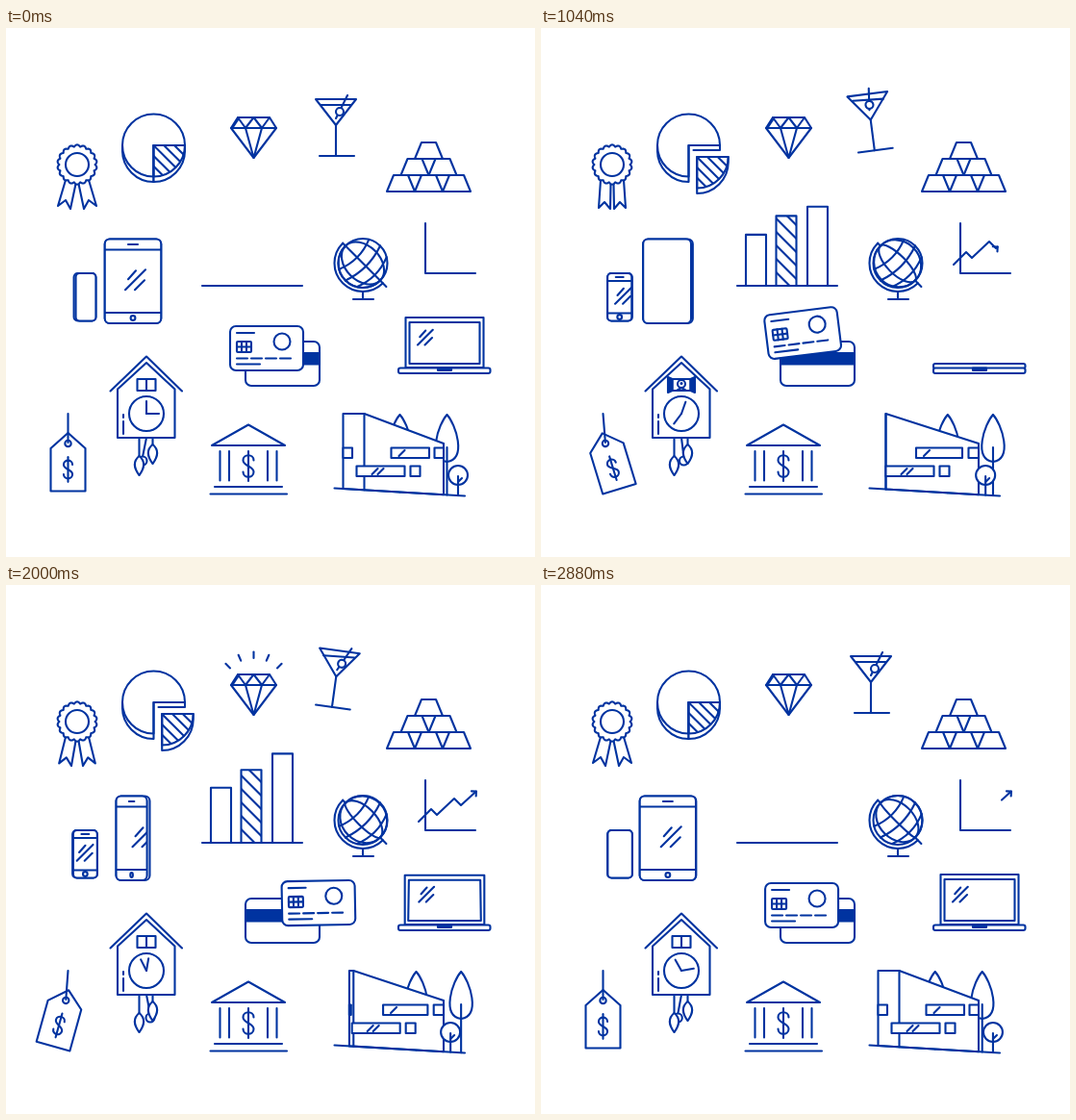
Recreate the animation shown at these times as an HTML page with a canvas. Size 550x550 px, loop 2.96 s.

```html
<!DOCTYPE html>
<html lang="en">
<head>
<meta charset="utf-8">
<title>Finance icons</title>
<style>
html, body { margin: 0; width: 100%; height: 100%; overflow: hidden; background: #fff; }
canvas { display: block; width: 550px; height: 550px; }
</style>
</head>
<body>
<canvas id="stage"></canvas>
<script>
const INK = '#0033a0', PAPER = '#fff';
const STEP = 80, STEPS = 37, LOOP = STEP * STEPS;
const TAU = Math.PI * 2, RAD = Math.PI / 180;
const { sin, cos, abs, min, max, floor, hypot } = Math;

const canvas = document.getElementById('stage');
const g = canvas.getContext('2d');
const dpr = window.devicePixelRatio || 1;
canvas.width = canvas.height = 550 * dpr;

// Timing: linear progress, eased progress, and out-and-back
const span = (t, a, b) => min(1, max(0, (t - a) / (b - a)));
const ease = (t, a, b) => { const u = span(t, a, b); return u * u * (3 - 2 * u); };
const pulse = (t, a, b, c, d) => ease(t, a, b) - ease(t, c, d);

// Drawing helpers
function paint(fill) {
  if (fill) { g.fillStyle = fill; g.fill(); }
  g.stroke();
}
function trace(p) {
  g.beginPath();
  for (let i = 0; i < p.length; i += 2) g.lineTo(p[i], p[i + 1]);
}
function line(...p) { trace(p); g.stroke(); }
function poly(fill, ...p) { trace(p); g.closePath(); paint(fill); }
function circle(x, y, r, fill) { g.beginPath(); g.arc(x, y, r, 0, TAU); paint(fill); }
function box(x0, y0, x1, y1, r = 0, fill = PAPER) {
  g.beginPath();
  g.roundRect(x0, y0, x1 - x0, y1 - y0, r);
  paint(fill);
}
function at(x, y, deg, draw) {
  g.save();
  g.translate(x, y);
  g.rotate(deg * RAD);
  draw();
  g.restore();
}
function hatch(x, y, w, h, gap) {
  g.save();
  g.clip();
  for (let k = -h; k < w; k += gap) line(x + k, y, x + k + h, y + h);
  g.restore();
}
function shine(x, y, s) {
  line(x - 5 * s, y - s, x + 3 * s, y - 10 * s);
  line(x - 8 * s, y + 10 * s, x + 13 * s, y - 11 * s);
  line(x + 2 * s, y + 10 * s, x + 12 * s, y);
}
function dollar(x, y, s) {
  const a = 5.5 * s, b = 6 * s, c = 13 * s;
  g.beginPath();
  g.moveTo(x + a, y - b);
  g.bezierCurveTo(x + a, y - c, x - a, y - c, x - a, y - b);
  g.bezierCurveTo(x - a, y, x + a, y, x + a, y + b);
  g.bezierCurveTo(x + a, y + c, x - a, y + c, x - a, y + b);
  g.stroke();
  line(x, y - 15.5 * s, x, y + 15.5 * s);
}

function rosette(t) {
  const c = pulse(t, 100, 960, 1240, 2300);
  for (const side of [1, -1]) {
    const x = v => 74 + side * (v - 74);
    line(x(62), 158, x(54 + 6 * c), 185 + 2 * c, x(62 + 4 * c), 179 + 2 * c,
      x(67 + 5 * c), 188, x(72.5), 162);
  }
  g.beginPath();
  for (let a = 0; a < TAU; a += TAU / 256) {
    const r = 18.6 + 2 * abs(sin(9 * a));
    g.lineTo(74 + r * cos(a), 142 + r * sin(a));
  }
  g.closePath();
  paint(PAPER);
  circle(74, 142, 12);
}

function pie(t) {
  const e = pulse(t, 360, 880, 2480, 2800);
  const cx = 153.5, cy = 122, r = 32.5, d = 5.5, q = TAU / 4;
  g.beginPath();
  g.moveTo(cx - r, cy);
  g.arc(cx, cy + d, r, 2 * q, q, true);
  g.lineTo(cx, cy);
  g.stroke();
  g.beginPath();
  g.moveTo(cx, cy);
  g.arc(cx, cy, r, q, 4 * q);
  g.closePath();
  g.stroke();
  if (e > .05) line(cx + r, cy, cx + r, cy + 5, cx + 5, cy + 5);

  const x = cx + 8.7 * e, y = cy + 12 * e;
  g.beginPath();
  g.moveTo(x, y);
  g.lineTo(x + r, y);
  g.arc(x, y + d, r, 0, q);
  g.closePath();
  paint(PAPER);
  g.beginPath();
  g.moveTo(x, y);
  g.arc(x, y, r, 0, q);
  g.closePath();
  g.stroke();
  hatch(x, y, r, r, 10.8);
}

function diamond(t) {
  poly(null, 234, 104, 241, 93, 274, 93, 281, 104, 257.5, 135);
  line(234, 104, 281, 104);
  line(241, 93, 249, 104, 257.5, 93, 266, 104, 274, 93);
  line(249, 104, 257.5, 135, 266, 104);
  line(236, 103, 242, 94);
  for (const start of [120, 1800]) {
    const u = (t - start) / 400;
    if (u <= 0 || u >= 1) continue;
    const r0 = 34 + 6 * max(0, 2 * u - 1), r1 = 34 + 6.5 * min(1, 2 * u);
    for (let i = -2; i <= 2; i++) {
      const a = i * 23 * RAD;
      line(257.5 + r0 * sin(a), 110 - r0 * cos(a), 257.5 + r1 * sin(a), 110 - r1 * cos(a));
    }
  }
}

function martini(t) {
  const lift = pulse(t, 480, 1160, 1920, 2760);
  const deg = 8 * lift * (2 * ease(t, 1240, 1920) - 1);
  const s = pulse(t, 720, 1160, 1440, 1960);
  at(343, 103 - 6 * lift, deg, () => {
    poly(null, -21, -29, 21, -29, 0, -2);
    line(0, -2, 0, 30);
    line(-17, 30, 19, 30);
    const dy = 8 * Math.tan(deg * RAD);
    line(-16, -23 + dy, 16, -23 - dy);
    line(12 - 12 * s, -33 - 2 * s, 0, -9 - 4 * s);
    circle(4 - 4 * s, -16 - 2 * s, 4, PAPER);
  });
}

function goldBars() {
  for (let row = 0; row < 3; row++) {
    for (let i = 0; i <= row; i++) {
      const x = 439.5 + (i - row / 2) * 29, y = 119 + row * 17;
      poly(null, x - 7.5, y, x + 7.5, y, x + 14.5, y + 17, x - 14.5, y + 17);
    }
  }
}

function barChart(t) {
  const sway = cos((t - 750) / 1400 * TAU);
  const bar = (x, mid, reach, start, striped) => {
    const h = (mid + reach * sway) * pulse(t, start, start + 380, 2480, 2840);
    if (h < 1) return;
    g.beginPath();
    g.rect(x, 268 - h, 21, h);
    g.stroke();
    if (striped) hatch(x, 168, 21, 100, 14);
  };
  bar(213, 51, 8, 40);
  bar(244.5, 71, 6, 0, true);
  bar(277, 77, 20, 40);
  line(204, 268, 308, 268);
}

function globe(t) {
  const r = 25.5;
  at(371, 244.5, -45, () => {
    circle(0, 0, r);
    for (const y of [-13, 0, 13]) {
      const x = Math.sqrt(r * r - y * y);
      g.beginPath();
      g.moveTo(-x, y);
      g.quadraticCurveTo(0, y + 9, x, y);
      g.stroke();
    }
    const phase = t / LOOP * 180 % 45;
    for (let k = 0; k < 4; k++) {
      const s = sin((phase + k * 45 - 90) * RAD);
      g.beginPath();
      g.ellipse(0, 0, r * abs(s), r, 0, -TAU / 4, TAU / 4, s < 0);
      g.stroke();
    }
    g.beginPath();
    g.arc(0, 0, 29.5, -TAU / 4, TAU / 4, true);
    g.stroke();
    line(0, -r, 0, -29.5);
    line(0, r, 0, 34.5);
  });
  line(371, 274, 371, 282);
  line(361, 282, 382, 282);
}

function trend(t) {
  line(436, 203, 436, 255, 488, 255);
  const pts = [[429, 246], [442, 233], [448, 239], [466, 222], [473, 229], [489, 214.5]];
  const head = 83 * (1 - (1 - span(t, 80, 1680)) ** 1.6);
  const tail = 83 * span(t, 2276, 2996);
  if (head - tail < 1) return;
  let run = 0, tip, dir;
  g.beginPath();
  for (let i = 1; i < pts.length; i++) {
    const [ax, ay] = pts[i - 1], [bx, by] = pts[i];
    const len = hypot(bx - ax, by - ay);
    const u0 = max(0, (tail - run) / len), u1 = min(1, (head - run) / len);
    if (u0 < u1) {
      const p = u => [ax + (bx - ax) * u, ay + (by - ay) * u];
      g.lineTo(...p(u0));
      tip = p(u1);
      g.lineTo(...tip);
      dir = Math.atan2(by - ay, bx - ax);
    }
    run += len;
  }
  g.stroke();
  if (tip) at(...tip, dir / RAD, () => line(-3.5, -3.5, 0, 0, -3.5, 3.5));
}

// A slab turning about its upright axis, screen on one side only.
function device(cx, w, y, h, deg, bezel, s) {
  const c = cos(deg * RAD), sn = sin(deg * RAD);
  const half = max(abs(c) * w / 2, .5), off = 1.7 * sn;
  const near = cx + (c > 0 ? off : -off), edge = half + abs(off);
  box(cx - edge, y, cx + edge, y + h, min(5 * s, edge));
  box(near - half, y, near + half, y + h, min(5 * s, half));
  if (c < .12) return;
  g.save();
  g.clip();
  const low = y + h - bezel;
  line(near - half, y + bezel, near + half, y + bezel);
  line(near - half, low, near + half, low);
  line(near - 5 * s * c, y + bezel / 2, near + 5 * s * c, y + bezel / 2);
  g.beginPath();
  g.ellipse(near, low + bezel / 2, 2.4 * c, 2.4, 0, 0, TAU);
  g.stroke();
  shine(cx - 9 * sn, y + h / 2 - 1, s);
  g.restore();
}

function devices(t) {
  const small = -145 * (1 - span(t, 0, 1400)) ** 2 + 215 * span(t, 1400, LOOP) ** 3;
  const big = 175 * t / LOOP + 185 * ease(t, 560, 1560);
  device(82, 25.5, 255, 49.5, small, 8, .8);
  device(132, 58.5, 219.5, 87.5, big, 11, 1);
}

function cards(t) {
  box(249, 326, 326, 372, 6);
  g.fillStyle = INK;
  g.fillRect(249, 337, 77, 13.5);
  const lift = pulse(t, 800, 1240, 1280, 2160);
  const slide = pulse(t, 960, 1880, 1980, 2900);
  at(271 + 54 * slide, 333 - 28 * lift, -12.5 * lift, () => {
    box(-38, -23, 38, 23, 6);
    line(-31, -16, -13, -16);
    box(-31, -7, -16, 4, 1);
    line(-31, -1.5, -16, -1.5);
    line(-26, -7, -26, 4);
    line(-21, -7, -21, 4);
    for (let x = -31; x < 20; x += 15) line(x, 10.5, x + 11, 10.5);
    line(-31, 16.5, -7, 16.5);
    circle(16, -7, 8.5);
  });
}

function laptop(t) {
  const fold = pulse(t, 80, 1120, 1520, 2120);
  const lean = sin(fold * 90 * RAD), h = 52 * cos(fold * 90 * RAD), top = 353 - h;
  if (h < 5) {
    box(408, 349, 503.5, 354, 2);
  } else {
    const lid = (x, y, low, base) => poly(PAPER, 456 - x, y, 456 + x, y, 456 + base, low, 456 - base, low);
    const w = 40.5 + 5 * lean;
    lid(w, top, 353, w);
    if (h > 12) lid(w - 4 - lean, top + 5, 349, w - 4 + 3 * lean);
    if (lean > .6) line(456 - w, top + 2.5, 456 + w, top + 2.5);
    if (lean < .7) shine(434 + 8 * lean, top + 21 - 4 * lean, .75);
  }
  box(408, 353.5, 503.5, 359, 2);
  box(449, 353.5, 463, 356, 0, INK);
}

function weight(x, y) {
  line(x, 426, x, y);
  g.beginPath();
  g.moveTo(x, y);
  g.bezierCurveTo(x + 6, y + 5, x + 6, y + 12, x, y + 20);
  g.bezierCurveTo(x - 6, y + 12, x - 6, y + 5, x, y);
  paint(PAPER);
}

function clock(t) {
  const px = 147 - 5 * cos(t / LOOP * 2 * TAU);
  line(146, 426, px, 446);
  circle(px, 450, 4.5, PAPER);
  weight(138.5, 445);
  weight(152.5, 433);
  poly(PAPER, 116, 375.5, 146, 348, 175.5, 375.5, 175.5, 426, 116, 426);
  line(108.5, 377.5, 146, 341.5, 183, 377.5);
  line(122, 402, 122, 405);
  line(122, 409, 122, 422);

  const open = pulse(t, 120, 520, 1520, 1840);
  box(136.5, 365, 155.5, 377);
  if (open < .05) {
    line(146, 365, 146, 377);
  } else {
    circle(146, 370, 4);
    circle(146, 369.5, .5, INK);
    line(141, 377, 146, 374, 151, 377);
    for (const side of [-1, 1]) {
      const hinge = 146 + side * 9.5, edge = hinge + side * (9 * open - 4.5);
      const flare = 2 * open;
      poly(INK, hinge, 365, edge, 365 - flare, edge, 377 + flare, hinge, 377);
    }
  }

  circle(146, 401, 18);
  const hand = deg => line(146, 401, 146 + 13 * sin(deg * RAD), 401 - 13 * cos(deg * RAD));
  hand(t / LOOP * 1080);
  hand(90 + t / LOOP * 360);
}

function bank() {
  poly(null, 214, 434, 252, 412.5, 290, 434);
  for (const x of [222.5, 232, 272, 281.5]) line(x, 440, x, 470.5);
  dollar(252, 455.5, 1);
  line(217, 477, 287, 477);
  line(212.5, 484.5, 292, 484.5);
}

function tag(t) {
  const deg = 15.5 * pulse(t, 1360, 1840, 2200, 2800) - 17 * pulse(t, 240, 800, 1120, 1680);
  const a = deg * .27 * RAD;
  at(64.5 - 31 * sin(a), 401 + 31 * cos(a), deg, () => {
    poly(PAPER, -18, 5, 0, -11, 18, 5, 18, 49.5, -18, 49.5);
    circle(0, 0, 3.2);
    dollar(0, 27, .83);
  });
  line(64.5, 401, 64.5 - 30 * sin(a), 401 + 30 * cos(a));
}

const ground = x => 478.5 + (x - 341.5) / 17;

function leafTree(x) {
  const top = 402;
  g.beginPath();
  g.moveTo(x, top);
  g.bezierCurveTo(x + 9, top + 10, x + 21, top + 46, x, top + 49);
  g.bezierCurveTo(x - 21, top + 46, x - 9, top + 10, x, top);
  paint(PAPER);
  line(x, 436, x, ground(x));
}

function house(t) {
  const r = pulse(t, 240, 880, 1840, 2400);
  const q = pulse(t, 0, 1560, 1840, LOOP);
  leafTree(409.5 + 18 * q);
  leafTree(458.5 + 15.5 * q);

  const left = 350.5 + 8 * r, corner = 372.5 - 14 * r;
  poly(PAPER, left, 401, corner, 401, 455, 432, 455, ground(455), left, ground(left));
  line(corner, 401, corner, ground(corner));
  if (r < .9) box(left, 436.5, left + 9.5 * (1 - r), 447);
  const long = 400.5 - 10.5 * r, low = 364.5 - 6 * r;
  box(long, 436.5, 440 - 2 * r, 447);
  box(445.5 - r, 436.5, 455, 447);
  box(low, 455.5, low + 50, 466);
  box(low + 56, 455.5, low + 66, 466);
  line(long + 8, 445, long + 14, 439);
  for (const x of [low + 16, low + 22]) line(x, 464, x + 6, 458);

  const bush = 470 - 4.5 * (r + q);
  circle(bush, 465, 10, PAPER);
  line(bush, 466, bush, ground(bush));
  line(bush, 472, bush + 4, 468);
  line(341.5, ground(341.5), 477, ground(477));
}

const scene = [rosette, pie, diamond, martini, goldBars, barChart, globe, trend,
  devices, cards, laptop, clock, bank, tag, house];

function frame() {
  const t = floor(performance.now() / STEP) % STEPS * STEP;
  g.setTransform(dpr, 0, 0, dpr, 0, 0);
  g.fillStyle = PAPER;
  g.fillRect(0, 0, 550, 550);
  g.strokeStyle = INK;
  g.lineWidth = 2.1;
  g.lineCap = g.lineJoin = 'round';
  for (const draw of scene) draw(t);
  requestAnimationFrame(frame);
}
frame();
</script>
</body>
</html>
```
